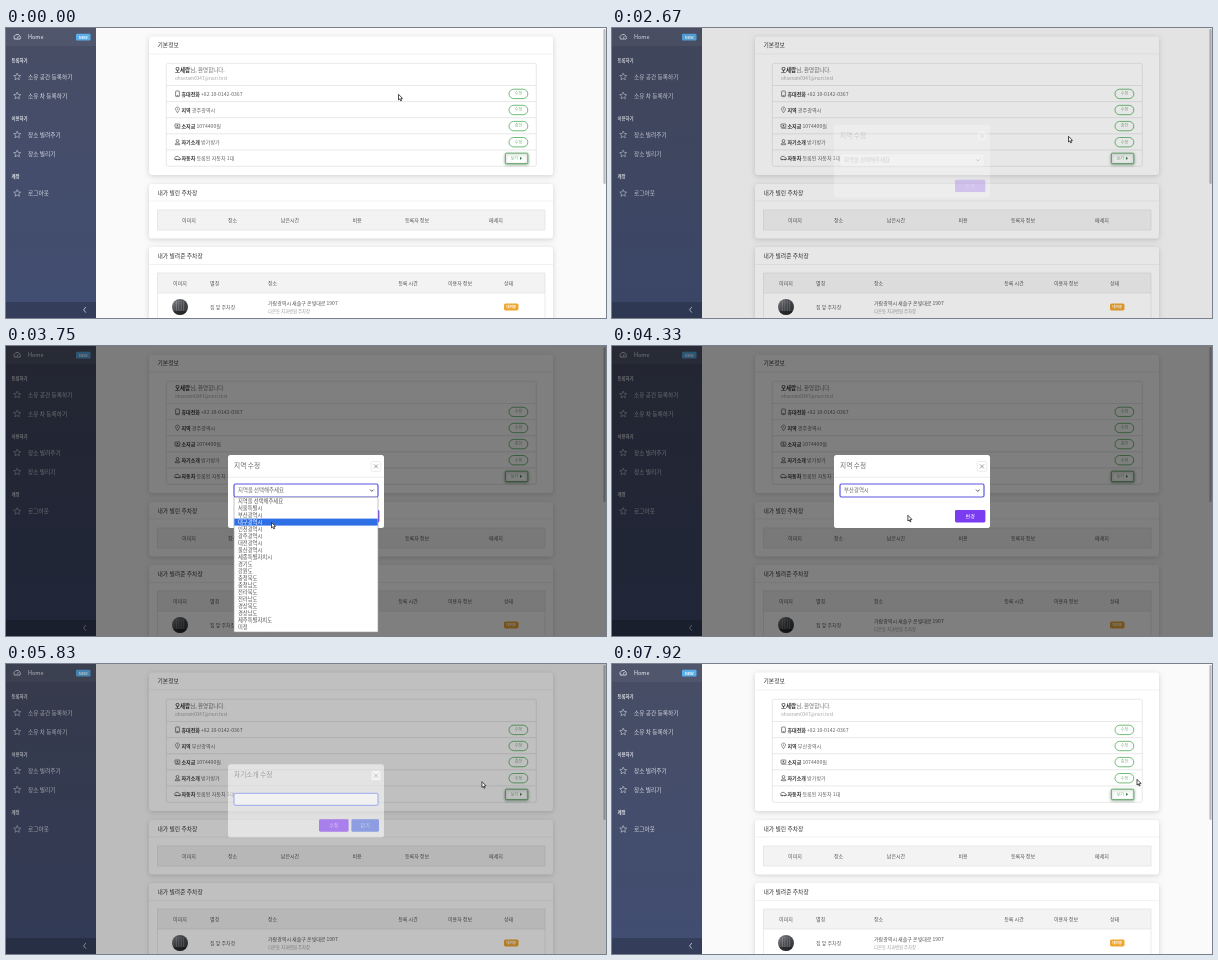
An HTML page with a canvas that plays this animation: 600x290 px, repeating every 8000 ms.

```html
<!DOCTYPE html>
<html lang="ko">
<head>
<meta charset="utf-8">
<title>주차장 마이페이지</title>
<style>
html, body { margin: 0; width: 600px; height: 290px; overflow: hidden; background: #fafafa; }
canvas { display: block; width: 600px; height: 290px; }
</style>
</head>
<body>
<canvas id="stage"></canvas>
<script>
const W = 600, H = 290, LOOP = 8000, FPS = 12;
const FONT = '"Noto Sans CJK KR", "Noto Sans CJK", "Noto Sans", sans-serif';
const canvas = document.getElementById('stage');
const dpr = window.devicePixelRatio || 1;
canvas.width = W * dpr;
canvas.height = H * dpr;
const c = canvas.getContext('2d');

// ---------- helpers ----------
function text(s, x, y, size = 5, color = '#555', weight = 400, align = 'left') {
  c.font = `${weight} ${size}px ${FONT}`;
  c.fillStyle = color;
  c.textAlign = align;
  c.textBaseline = 'alphabetic';
  c.fillText(s, x, y + size * 0.36);
}

function box(x, y, w, h, r, fill, stroke, lw = 0.7) {
  c.beginPath();
  c.roundRect(x, y, w, h, r);
  if (fill) { c.fillStyle = fill; c.fill(); }
  if (stroke) { c.strokeStyle = stroke; c.lineWidth = lw; c.stroke(); }
}

function path(points, color, lw = 0.7, close = false) {
  c.beginPath();
  points.forEach(([x, y], i) => i ? c.lineTo(x, y) : c.moveTo(x, y));
  if (close) c.closePath();
  c.strokeStyle = color;
  c.lineWidth = lw;
  c.stroke();
}

function circle(x, y, r, fill, stroke, lw = 0.7) {
  c.beginPath();
  c.arc(x, y, r, 0, Math.PI * 2);
  if (fill) { c.fillStyle = fill; c.fill(); }
  if (stroke) { c.strokeStyle = stroke; c.lineWidth = lw; c.stroke(); }
}

const rule = (x1, x2, y, color = '#e2e2e2') => path([[x1, y], [x2, y]], color);
const clamp = v => Math.max(0, Math.min(1, v));
const easeOut = v => 1 - Math.pow(1 - clamp(v), 1.8);
const smooth = v => v * v * (3 - 2 * v);

// ---------- sidebar ----------
function star(x, y) {
  const pts = [];
  for (let i = 0; i < 10; i++) {
    const a = -Math.PI / 2 + i * Math.PI / 5, r = i % 2 ? 1.7 : 3.7;
    pts.push([x + r * Math.cos(a), y + r * Math.sin(a)]);
  }
  path(pts, '#b9bfcc', 0.7, true);
}

function sidebar() {
  const g = c.createLinearGradient(0, 0, 0, H);
  g.addColorStop(0, '#474d64');
  g.addColorStop(1, '#414d72');
  c.fillStyle = g;
  c.fillRect(0, 0, 90, H);
  c.fillStyle = 'rgba(255,255,255,.05)';
  c.fillRect(0, 0, 90, 18);

  c.beginPath();
  c.arc(11.2, 9.6, 3.2, Math.PI * 0.85, Math.PI * 2.15);
  c.closePath();
  c.strokeStyle = '#d5d9e2';
  c.lineWidth = 0.9;
  c.stroke();
  path([[11.2, 10.4], [12.4, 8]], '#d5d9e2', 0.8);
  text('Home', 22, 9, 5.5, '#f0f1f5');
  box(70, 5.8, 14.5, 6.6, 1, '#5aaeea');
  text('NEW', 77.2, 9.1, 4, '#e8f5ff', 700, 'center');

  [['등록하기', 32], ['이용하기', 90], ['계정', 148]]
    .forEach(([s, y]) => text(s, 5.5, y, 4.4, '#e4e6ec', 700));
  [['소유 공간 등록하기', 48.5], ['소유 차 등록하기', 67.5], ['장소 빌려주기', 106.5],
   ['장소 빌리기', 125.5], ['로그아웃', 165]].forEach(([s, y]) => {
    star(11.2, y + 0.3);
    text(s, 22, y, 5.7, '#d9dce5');
  });

  c.fillStyle = 'rgba(0,0,0,.2)';
  c.fillRect(0, 274, 90, 16);
  path([[79.8, 279], [77.6, 281.8], [79.8, 284.6]], '#c3c8d4', 0.9);
}

// ---------- page ----------
function card(y, h, title, lineY) {
  c.save();
  c.shadowColor = 'rgba(0,0,0,.16)';
  c.shadowBlur = 5 * dpr;
  c.shadowOffsetY = 1.2 * dpr;
  box(143, y, 404, h, 3, '#fff');
  c.restore();
  text(title, 151.5, (y + lineY) / 2, 5.8, '#333', 500);
  rule(143, 547, lineY, '#ececec');
}

const ICON = '#555';
const icons = [
  y => { box(169.6, y - 2.8, 3.8, 5.6, 0.6, null, ICON); rule(170.5, 172.5, y + 1.8, ICON); },
  y => {
    c.beginPath();
    c.arc(171.5, y - 0.9, 2, Math.PI * 0.85, Math.PI * 2.15);
    c.lineTo(171.5, y + 2.9);
    c.closePath();
    c.strokeStyle = ICON;
    c.lineWidth = 0.6;
    c.stroke();
    circle(171.5, y - 0.9, 0.6, ICON);
  },
  y => {
    box(169, y - 2, 4.8, 3.2, 0.3, null, ICON);
    circle(171.4, y - 0.4, 0.8, ICON);
    rule(169.4, 174.4, y + 2.2, ICON);
  },
  y => {
    circle(171.5, y - 1.2, 1.4, null, ICON);
    path([[169.2, y + 2.6], [170, y + 0.9], [173, y + 0.9], [173.8, y + 2.6]], ICON, 0.7, true);
  },
  y => {
    path([[168.8, y + 1.3], [168.8, y - 0.4], [169.8, y - 1.8], [172.2, y - 1.8],
      [173.2, y - 0.4], [174.4, y], [174.4, y + 1.3]], ICON, 0.7, true);
    circle(170.2, y + 1.4, 0.8, ICON);
    circle(173, y + 1.4, 0.8, ICON);
  }
];

function profile(region) {
  card(8.5, 138.5, '기본정보', 26);
  box(160.3, 35.3, 370, 103, 2, '#fff', '#dedede');
  text('오세람', 169, 42.3, 5.5, '#333', 700);
  text('님, 환영합니다.', 169 + c.measureText('오세람').width, 42.3, 5.5, '#666');
  text('ohseram0347@nuri.test', 169, 50.6, 4.7, '#a5a5a5');

  const rows = [
    ['휴대전화', '+82 10-0142-0367', '수정'],
    ['지역', region, '수정'],
    ['소지금', '1074400원', '충전'],
    ['자기소개', '방가방가', '수정'],
    ['자동차', '등록된 자동차 1대', '']
  ];
  rows.forEach(([label, value, action], i) => {
    const y = 65.8 + i * 16.1;
    rule(160.3, 530.3, y - 8.3, '#e0e0e0');
    icons[i](y);
    text(label, 175.5, y, 5, '#333', 700);
    text(value, 175.5 + c.measureText(label + ' ').width, y, 5.1, '#666');
    if (action) {
      box(503, y - 4.6, 18.8, 9.4, 4.7, '#fff', '#62b56b', 0.9);
      text(action, 512.4, y, 4.1, '#79ba80', 400, 'center');
    }
  });

  c.save();
  c.shadowColor = 'rgba(40,90,50,.45)';
  c.shadowBlur = 3 * dpr;
  c.shadowOffsetY = dpr;
  box(499.4, 125.2, 22.4, 10.4, 0.8, '#fff', '#5fa568', 0.9);
  c.restore();
  text('보기', 504.5, 130.3, 4.1, '#79ba80');
  c.beginPath();
  c.moveTo(514, 128.7);
  c.lineTo(516.2, 130.3);
  c.lineTo(514, 131.9);
  c.fillStyle = '#3f8c4a';
  c.fill();
}

function tableHead(y, cells) {
  box(151.5, y, 387.5, 20, 0, '#f3f3f4', '#e0e0e0');
  cells.forEach(([s, x]) => text(s, x, y + 10, 5, '#555', 400, 'center'));
}

function photo(x, y) {
  c.save();
  c.beginPath();
  c.arc(x, y, 8, 0, Math.PI * 2);
  c.clip();
  const g = c.createLinearGradient(x - 8, y - 8, x + 8, y + 8);
  g.addColorStop(0, '#8b8d91');
  g.addColorStop(0.45, '#4c4e52');
  g.addColorStop(1, '#2c2e31');
  c.fillStyle = g;
  c.fillRect(x - 8, y - 8, 16, 16);
  c.fillStyle = 'rgba(190,192,195,.35)';
  for (let i = 0; i < 4; i++) c.fillRect(x - 4 + i * 2.4, y - 6, 0.9, 10);
  c.fillStyle = 'rgba(20,20,22,.5)';
  c.fillRect(x - 8, y + 4, 16, 5);
  c.restore();
}

function page(region, scroll) {
  c.fillStyle = '#fafafa';
  c.fillRect(0, 0, W, H);
  c.save();
  c.translate(0, -scroll);
  profile(region);

  card(156, 54.5, '내가 빌린 주차장', 173);
  tableHead(182, [['이미지', 183], ['장소', 226.5], ['남은시간', 284], ['비용', 351],
    ['등록자 정보', 411], ['메세지', 490]]);

  card(219, 84, '내가 빌려준 주차장', 236.5);
  tableHead(245, [['이미지', 174], ['별칭', 208.7], ['장소', 266.5], ['등록 시간', 402],
    ['이용자 정보', 454], ['상태', 502.5]]);
  path([[151.5, 265], [151.5, 293.5], [539, 293.5], [539, 265]], '#e4e4e4');
  photo(174, 279);
  text('집 앞 주차장', 204, 279, 5, '#666');
  text('가람광역시 새솔구 온빛대로 1907', 262, 275, 5, '#555');
  text('다온동 치과병원 주차장', 262, 283, 4.35, '#a0a0a0');
  box(498, 275.4, 14.5, 7, 1.6, '#f0a52c');
  text('대여중', 505.2, 279, 3.6, '#fff', 700, 'center');
  c.restore();

  box(597.4, 1 + scroll * 0.53, 2.2, 155, 1.1, '#bdbdbd');
  sidebar();
}

// ---------- dialogs ----------
const REGIONS = ('서울특별시 부산광역시 대구광역시 인천광역시 광주광역시 대전광역시 울산광역시 ' +
  '세종특별자치시 경기도 강원도 충청북도 충청남도 전라북도 전라남도 경상북도 경상남도 ' +
  '제주특별자치도 미정').split(' ');
const OPTIONS = ['지역을 선택해주세요', ...REGIONS];

function button(x, w, label, color) {
  box(x, 164, w, 12.4, 1.4, color);
  text(label, x + w / 2, 170.2, 5, '#fff', 400, 'center');
}

function dialog(t, d) {
  const opening = (t - d.open) / 150, closing = (t - d.close) / 150;
  if (opening <= 0 || closing >= 1) return;
  const p = clamp(opening) * (1 - clamp(closing));
  const slide = closing > 0 ? easeOut(closing / 2) : 1 - easeOut(opening / 2);

  c.fillStyle = `rgba(0,0,0,${0.5 * Math.pow(p, 1.2)})`;
  c.fillRect(0, 0, W, H);
  c.save();
  c.globalAlpha = p;
  c.translate(0, -15.6 * slide);
  box(222, 109, 156, 73, 2.5, '#fff');
  text(d.title, 228, 119.6, 6.7, '#666');
  box(365.2, 115.5, 9.6, 9.8, 1.5, '#fff', '#e3e3e3');
  path([[368, 118.4], [372, 122.4]], '#777');
  path([[372, 118.4], [368, 122.4]], '#777');
  rule(222, 378, 131.3, '#e6e6e6');
  d.body(t);
  c.restore();
}

function regionBody(t) {
  const focus = t >= 3160 && t < 4560;
  box(228, 138, 144, 13, 1.5, '#fff', focus ? '#5a55e0' : '#d5d7dd', focus ? 1.2 : 0.7);
  text(t >= 4160 ? REGIONS[1] : OPTIONS[0], 232, 144.5, 5.4, '#666');
  path([[364, 143.6], [365.8, 145.4], [367.6, 143.6]], '#444', 0.9);
  button(343, 30.4, '변경', '#7a3cf0');
  if (t < 3240 || t >= 4160) return;

  box(228, 151.3, 144, 134.7, 0, '#fff', '#9a9a9a', 0.6);
  const [, y] = cursorAt(t);
  const hot = t < 3320 ? 0 : Math.max(0, Math.floor((y - 151.5) / 7.03));
  OPTIONS.forEach((s, i) => {
    const cy = 155 + i * 7.03;
    if (i === hot) {
      c.fillStyle = '#2f6fe6';
      c.fillRect(228.3, cy - 3.5, 143.4, 7);
    }
    text(s, 232, cy, 5.3, i === hot ? '#fff' : '#555');
  });
}

function introBody(t) {
  box(228, 138, 144, 12, 1.5, '#fff', '#5a70ee', 1);
  if (t >= 6080) text(t >= 6160 ? '대' : 'ㄷ', 232, 144, 5.2, '#555');
  button(313, 29.6, '수정', '#7a2ff2');
  button(345.4, 27.6, '닫기', '#4667de');
}

const dialogs = [
  { title: '지역 수정', open: 2630, close: 4690, body: regionBody },
  { title: '자기소개 수정', open: 5750, close: 6475, body: introBody }
];

// ---------- pointer: time, x, y ----------
const TRACK = [
  [0, 392, 66], [417, 533, 48.5], [500, 533, 48.5], [1333, 522, 93], [1750, 508.5, 80.5],
  [2083, 508.5, 80.5], [2167, 508, 81], [2417, 508, 81], [2667, 456, 108], [3250, 300, 142],
  [3750, 265, 176], [4083, 262, 169], [4167, 262, 169], [4583, 357, 169], [4917, 357, 169],
  [5250, 463.5, 127], [5500, 463.5, 127], [5667, 508, 113], [5750, 508, 113], [6083, 300, 141],
  [6167, 300, 141], [6417, 173.5, 139], [7250, 173.5, 139], [7750, 542, 116],
  [7917, 524.5, 115], [8000, 524.5, 115]
];

function cursorAt(t) {
  const i = Math.max(1, TRACK.findIndex(k => k[0] > t));
  const [t0, x0, y0] = TRACK[i - 1], [t1, x1, y1] = TRACK[i];
  const f = smooth(clamp((t - t0) / (t1 - t0)));
  return [x0 + (x1 - x0) * f, y0 + (y1 - y0) * f];
}

function outline(points, x, y, lw) {
  c.beginPath();
  points.forEach(([px, py], i) => i ? c.lineTo(x + px, y + py) : c.moveTo(x + px, y + py));
  c.closePath();
  c.lineJoin = 'round';
  c.fillStyle = '#fff';
  c.fill();
  c.strokeStyle = '#222';
  c.lineWidth = lw;
  c.stroke();
}

const ARROW = [[0.5, 0.3], [0.5, 6], [1.8, 4.9], [2.7, 6.9], [3.6, 6.5], [2.8, 4.6], [4.5, 4.4]];
const HAND = [[-0.2, 0], [0.9, 0], [1, 2.4], [4, 3], [4.2, 5], [3.6, 7], [0.4, 7], [-1.8, 4.4],
  [-1.2, 3.8], [-0.2, 4.5]];

function pointer(t) {
  const [x, y] = cursorAt(t);
  const hand = (t > 1660 && t < 2480) || (t > 5640 && t < 5760);
  if (hand) outline(HAND, x, y, 0.8);
  else outline(ARROW, x, y, 0.8);
}

// ---------- loop ----------
function scrollAt(t) {
  const f = clamp((t - 500) / 917);
  return 40 * Math.pow(Math.sin(Math.PI * f), 2);
}

function draw(t) {
  c.setTransform(dpr, 0, 0, dpr, 0, 0);
  page(t < 4990 ? '광주광역시' : '부산광역시', scrollAt(t));
  dialogs.forEach(d => dialog(t, d));
  pointer(t);
}

const start = performance.now();
function tick(now) {
  const ms = Math.max(0, now - start) % LOOP;
  const step = Math.floor(ms * FPS / 1000 + 0.05) % (LOOP * FPS / 1000);
  draw(step * 1000 / FPS);
  requestAnimationFrame(tick);
}
draw(0);
requestAnimationFrame(tick);
</script>
</body>
</html>
```
